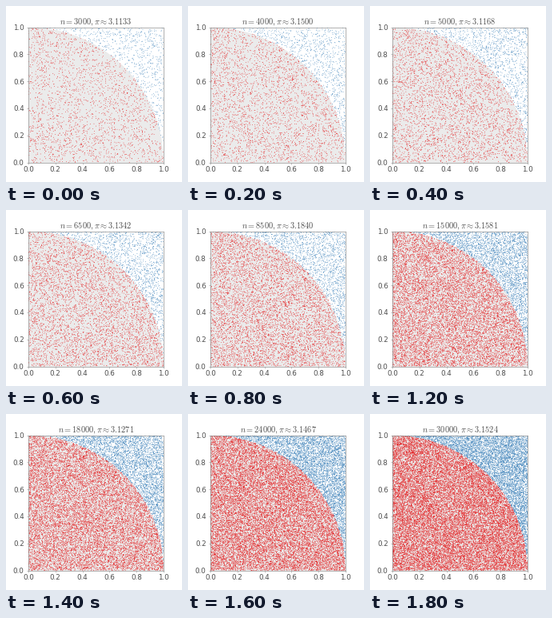
Recreate the animation shown at these times as a matplotlib script. Size 220x220 px, loop 2 s.

```python
import numpy as np
import matplotlib.pyplot as plt
from matplotlib.animation import FuncAnimation
from matplotlib.colors import to_rgba
from matplotlib.patches import Circle

STAGE = 220
DPI = 72
INK = "#4d4d4d"
EDGE = "#808080"
RED, BLUE = to_rgba("#e41a1c"), to_rgba("#377eb8")

# (points drawn, points that land inside the quarter disc)
TRIALS = [
    (3000, 2335), (4000, 3150), (5000, 3896), (6500, 5093), (8500, 6766),
    (11000, 8617), (15000, 11843), (18000, 14072), (24000, 18880),
    (30000, 23643),
]

plt.rcParams["font.family"] = "DejaVu Sans"
plt.rcParams["mathtext.fontset"] = "cm"

fig = plt.figure(figsize=(STAGE / DPI, STAGE / DPI), dpi=DPI, facecolor="white")
ax = fig.add_axes([27.9 / STAGE, 24.5 / STAGE, 169 / STAGE, 169 / STAGE])
ax.set(xlim=(0, 1), ylim=(0, 1))
ticks = np.linspace(0, 1, 6)
ax.set_xticks(ticks)
ax.set_yticks(ticks)
ax.tick_params(length=1.6, width=0.5, pad=2.9, color=EDGE,
               labelcolor=INK, labelsize=8.8)
ax.tick_params(axis="y", pad=3.6)
for spine in ax.spines.values():
    spine.set(linewidth=0.6, edgecolor=EDGE)

ax.add_patch(Circle((0, 0), 1, facecolor="#ebebeb", edgecolor="none", zorder=0))
dots = ax.scatter([], [], s=0.64, linewidths=0, zorder=1)
dots.set_snap(False)
title = fig.text(112.6 / STAGE, (STAGE - 22.7) / STAGE, "", ha="center",
                 va="baseline", fontsize=10.3, color=INK)


def sample(n, hits, seed):
    """Uniform points with a fixed number inside the quarter disc."""
    pts = np.random.default_rng(seed).random((2 * n, 2))
    inside = (pts ** 2).sum(axis=1) <= 1
    return pts[inside][:hits], pts[~inside][:n - hits]


def draw(i):
    n, hits = TRIALS[i]
    inner, outer = sample(n, hits, 40 + i)
    dots.set_offsets(np.vstack([inner, outer]))
    dots.set_facecolor(np.repeat([RED, BLUE], [len(inner), len(outer)], axis=0))
    title.set_text(rf"$n = {n}, \pi \approx {4 * hits / n:.4f}$")
    return dots, title


anim = FuncAnimation(fig, draw, frames=len(TRIALS), interval=200,
                     repeat=True, repeat_delay=0)
plt.show()
```
